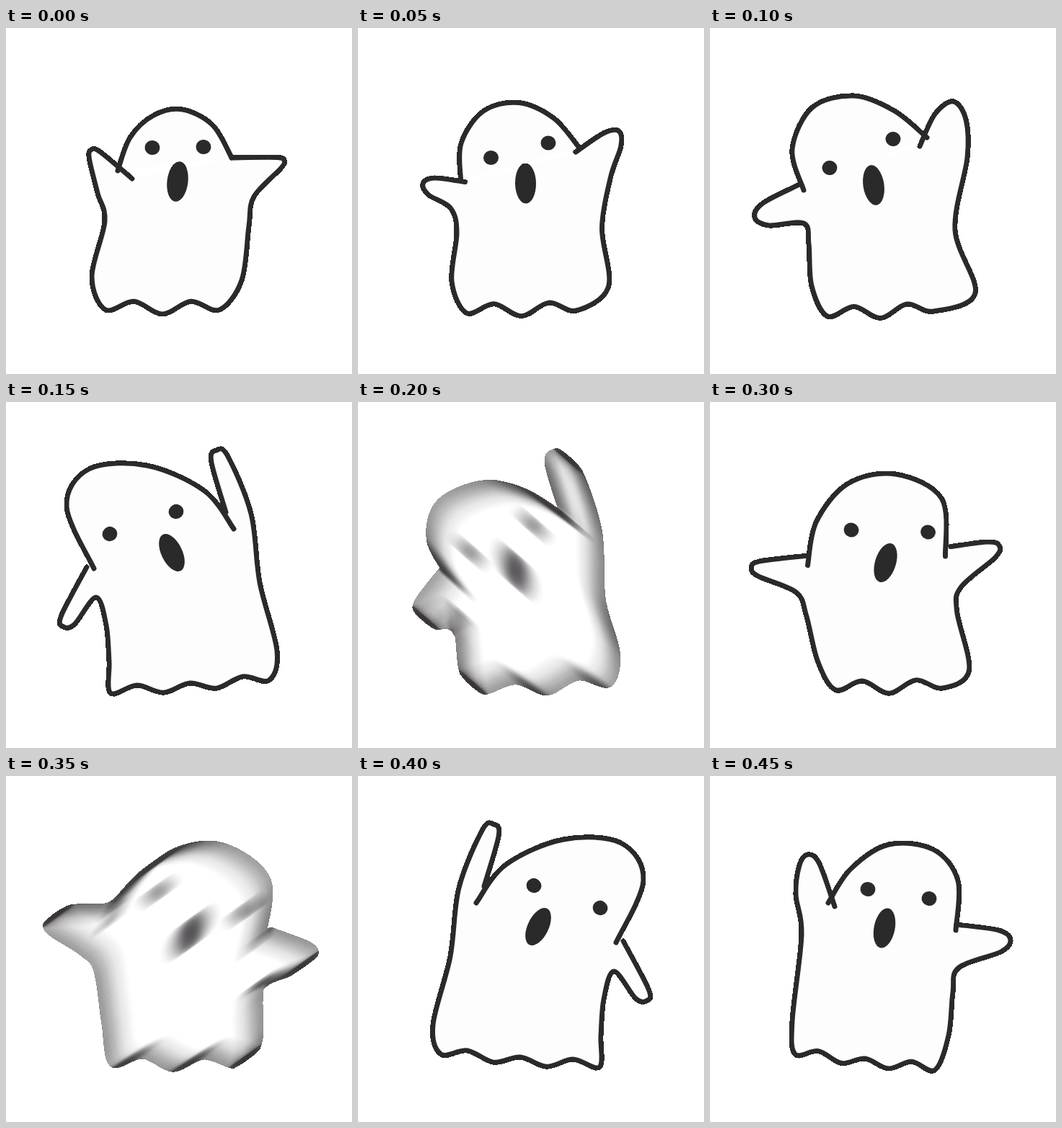
An HTML page with a canvas that plays this animation: 480x480 px, repeating every 500 ms.

```html
<!DOCTYPE html>
<html lang="en">
<head>
<meta charset="utf-8">
<title>Waving ghost</title>
<style>
  html, body { margin: 0; width: 100%; height: 100%; overflow: hidden; background: #fff; }
  canvas { display: block; width: 480px; height: 480px; }
</style>
</head>
<body>
<canvas id="stage" width="480" height="480"></canvas>
<script>
const SIZE = 480, STEP = 50, INK = '#2b2a2b', SHEET = '#fdfdfd';

// Key points of a pose: head arc, left arm (root, tip, root, radius), left side,
// hem (corner, corner, waves), right side, right arm, face (eye, eye, mouth, tilt)
const shout = [
  [[155, 198], [172, 152], [205, 121], [245, 113], [287, 135], [313, 180]],
  [[175, 209], [118, 169], [127, 229], 9], [[137, 268], [119, 345]],
  [[138, 391], [296, 391], 2],
  [[327, 350], [337, 275]], [[344, 234], [386, 184], [313, 180], 8],
  [[203, 166], [274, 165], [238, 213], 0.12]];

const leanLeft = [
  [[130, 225], [114, 168], [142, 110], [200, 94], [256, 115], [301, 152]],
  [[122, 218], [62, 263], [130, 271], 16], [[137, 300], [141, 358]],
  [[163, 400], [310, 393], 2],
  [[368, 368], [340, 280]], [[357, 180], [338, 102], [291, 164], 22],
  [[166, 194], [254, 154], [227, 218], -0.15]];

const swingRight = [
  [[140, 256], [109, 202], [122, 148], [184, 121], [245, 134], [303, 172]],
  [[124, 243], [91, 301], [141, 291], 12], [[148, 330], [153, 378]],
  [[165, 394], [339, 383], 2],
  [[350, 340], [330, 265]], [[325, 170], [281, 78], [291, 157], 13],
  [[155, 208], [243, 171], [219, 234], -0.3]];

const upright = [
  [[129, 247], [127, 172], [163, 113], [225, 96], [290, 116], [309, 190]],
  [[124, 238], [49, 262], [123, 290], 10], [[131, 330], [152, 385]],
  [[190, 407], [317, 400], 1],
  [[377, 375], [343, 265]], [[347, 225], [384, 147], [312, 180], 11],
  [[181, 194], [275, 173], [231, 228], 0.1]];

const swingUp = [
  [[142, 206], [168, 160], [220, 113], [290, 104], [353, 152], [344, 238]],
  [[148, 188], [66, 198], [116, 238], 11], [[136, 262], [147, 335]],
  [[158, 392], [328, 394], 2],
  [[342, 370], [342, 315]], [[350, 288], [419, 252], [356, 221], 13],
  [[211, 161], [330, 188], [256, 218], 0.5]];

const leanRight = [
  [[164, 176], [205, 123], [285, 88], [365, 93], [396, 145], [358, 231]],
  [[175, 153], [188, 67], [140, 155], 12], [[128, 250], [104, 345]],
  [[115, 386], [335, 404], 3],
  [[337, 360], [341, 310]], [[355, 271], [400, 312], [368, 229], 11],
  [[244, 152], [336, 183], [250, 209], 0.45]];

const settle = [
  [[164, 176], [195, 129], [248, 95], [310, 102], [344, 145], [341, 214]],
  [[173, 181], [135, 109], [119, 165], 14], [[127, 220], [114, 340]],
  [[118, 386], [312, 408], 3],
  [[331, 360], [337, 300]], [[345, 266], [417, 227], [342, 206], 15],
  [[219, 157], [304, 170], [242, 211], 0.2]];

const between = (a, b) =>
  Array.isArray(a) ? a.map((v, i) => between(v, b[i])) : (a + b) / 2;

// Rounded limb from one root around the tip to the other root
function arm([from, tip, to, radius]) {
  const x = tip[0] - (from[0] + to[0]) / 2, y = tip[1] - (from[1] + to[1]) / 2;
  const k = radius / Math.hypot(x, y);
  const edge = side => [tip[0] - k * (x + side * y), tip[1] - k * (y - side * x)];
  return [from, edge(1), tip, edge(-1), to];
}

// Scalloped edge that sags a little in the middle
function hem([a, b, waves]) {
  const count = 2 * Math.round(waves), height = 26 - 2.5 * count;
  return Array.from({ length: count + 1 }, (_, i) => {
    const t = i / count, sag = 6 * Math.sin(Math.PI * t);
    return [a[0] + (b[0] - a[0]) * t,
      a[1] + (b[1] - a[1]) * t + sag - (i % 2) * height];
  });
}

// Smooth Catmull-Rom curve through the points
function curve(points) {
  const path = new Path2D(), last = points.length - 1;
  const at = i => points[Math.max(0, Math.min(last, i))];
  path.moveTo(...points[0]);
  for (let i = 0; i < last; i++) {
    const [p, a, b, q] = [at(i - 1), at(i), at(i + 1), at(i + 2)];
    path.bezierCurveTo(a[0] + (b[0] - p[0]) / 6, a[1] + (b[1] - p[1]) / 6,
      b[0] - (q[0] - a[0]) / 6, b[1] - (q[1] - a[1]) / 6, b[0], b[1]);
  }
  return path;
}

function newLayer() {
  const layer = document.createElement('canvas');
  layer.width = layer.height = SIZE;
  return layer.getContext('2d', { willReadFrequently: true });
}

function drawGhost([head, leftArm, leftSide, hemline, rightSide, rightArm, face], flip) {
  const g = newLayer();
  if (flip) g.setTransform(-1, 0, 0, 1, SIZE, 0);
  const body = [...arm(leftArm), ...leftSide, ...hem(hemline), ...rightSide, ...arm(rightArm)];
  const lines = [curve(head), curve(body)];
  g.lineWidth = 7;
  g.lineCap = g.lineJoin = 'round';
  g.strokeStyle = INK;
  g.fillStyle = SHEET;
  lines.forEach(line => g.fill(line));
  lines.forEach(line => g.stroke(line));

  const [leftEye, rightEye, mouth, tilt] = face;
  const oval = ([x, y], rx, ry) => {
    g.beginPath();
    g.ellipse(x, y, rx, ry, tilt, 0, 2 * Math.PI);
    g.fill();
  };
  g.fillStyle = INK;
  oval(leftEye, 10.5, 10);
  oval(rightEye, 10.5, 10);
  oval(mouth, 14.5, 28);
  return g.canvas;
}

// Motion blur with weights that taper to both ends, then a hard silhouette
function render(pose, { blur = [0, 0], flip = false } = {}) {
  const ghost = drawGhost(pose, flip), g = newLayer();
  const moving = blur[0] !== 0, copies = moving ? 36 : 1;
  g.globalCompositeOperation = 'lighter';
  for (let i = 0; i < copies; i++) {
    const k = (i + 0.5) / copies - 0.5;
    g.globalAlpha = moving ? (2 - 4 * Math.abs(k)) / copies : 1;
    g.drawImage(ghost, blur[0] * k, blur[1] * k);
  }
  const image = g.getImageData(0, 0, SIZE, SIZE), px = image.data;
  const cut = moving ? 50 : 128;
  for (let i = 3; i < px.length; i += 4) px[i] = px[i] < cut ? 0 : 255;
  g.putImageData(image, 0, 0);
  return g.canvas;
}

const frames = [
  render(shout),
  render(between(shout, leanLeft)),
  render(leanLeft),
  render(leanRight, { flip: true }),
  render(swingRight, { blur: [55, 48] }),
  render(upright),
  render(between(upright, swingUp)),
  render(swingUp, { blur: [60, -43] }),
  render(leanRight),
  render(settle)
];

const stage = document.getElementById('stage').getContext('2d');
const start = performance.now();

function tick() {
  const time = performance.now() - start;
  stage.fillStyle = '#fff';
  stage.fillRect(0, 0, SIZE, SIZE);
  stage.drawImage(frames[Math.floor(time / STEP) % frames.length], 0, 0);
  requestAnimationFrame(tick);
}
tick();
</script>
</body>
</html>
```
